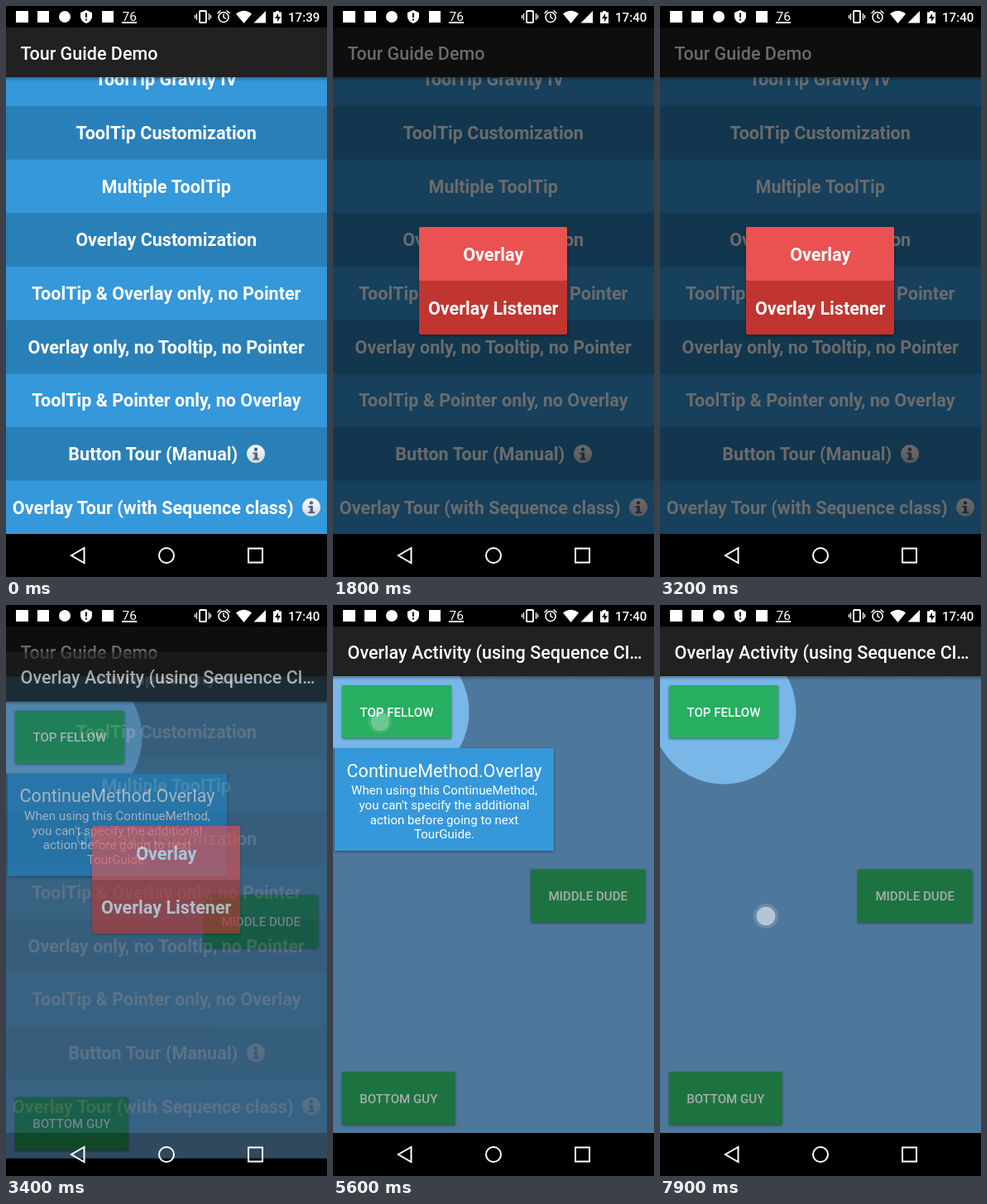
An HTML page for the animation above (8000 ms loop, 388 px wide and 690 px high).

```html
<!DOCTYPE html>
<html lang="en">
<head>
<meta charset="utf-8">
<title>Tour Guide Demo</title>
<style>
  html, body { margin: 0; width: 100%; height: 100%; overflow: hidden; background: #000; }
  svg { display: block; width: 388px; height: 690px; font: 500 21.56px Roboto, sans-serif; }
  text { fill: #fff; }
  .row { font-weight: 700; text-anchor: middle; }
  .small { font-size: 15.09px; text-anchor: middle; }
  .plain { font-weight: 400; text-anchor: middle; }
  .dimmed { fill: #a9adab; }
  .line { fill: none; stroke: #fff; stroke-width: 2; }
  .shadow { filter: drop-shadow(0 1.5px 1.5px rgba(0, 0, 0, .45)); }
</style>
</head>
<body>
<svg viewBox="0 0 388 690">
  <defs>
    <linearGradient id="fade" x2="0" y2="1">
      <stop stop-opacity=".3"/><stop offset="1" stop-opacity="0"/>
    </linearGradient>
    <linearGradient id="badge" x2="0" y2="1">
      <stop stop-color="#fff"/><stop offset="1" stop-color="#cfd4d8"/>
    </linearGradient>
    <clipPath id="page"><rect y="86" width="388" height="552"/></clipPath>
  </defs>
  <rect width="388" height="690"/>
  <g id="list"></g>
  <rect id="dim" y="26" width="388" height="612"/>
  <g id="activity"></g>
  <g id="popup"></g>
  <g id="touch" fill="#fff">
    <circle r="15" opacity=".15"/><circle r="11.3" opacity=".5"/>
  </g>
  <g id="status" fill="#fff">
    <rect width="388" height="26" fill="#000"/>
    <rect x="12" y="6" width="15" height="14"/>
    <rect x="38" y="6" width="14" height="14"/>
    <circle cx="71" cy="13" r="7"/>
    <path d="M97 5l7 3v5q0 5-7 8q-7-3-7-8V8z"/>
    <path d="M97 8.500v5.500M97 15.500v2" stroke="#000" stroke-width="2"/>
    <rect x="116" y="6" width="14" height="14"/>
    <text x="140.500" y="18" font-size="15.500" font-weight="400">76</text>
    <path d="M140 20h18" class="line" stroke-width="1"/>
    <rect x="234" y="6" width="8" height="14" rx="1" class="line"/>
    <path d="M230.500 9v8M245.500 9v8M228.500 11v4M247.500 11v4" class="line" style="stroke-width:1.300"/>
    <circle cx="263" cy="13.500" r="6" class="line" style="stroke-width:1.600"/>
    <path d="M263 9.500v4l3 2M255.500 9l4-3.500M270.500 9l-4-3.500" class="line" style="stroke-width:1.500"/>
    <path d="M278 9.500q9.500-7.500 19 0L287.500 21z"/>
    <path d="M299.500 20.500h14.500V6z"/>
    <path d="M323 7.500h3V6h4v1.500h3V21h-10z"/>
    <path d="M329 9l-4 6h3v4l4-6h-3z" fill="#000"/>
    <text id="clock" x="341" y="18.800" font-size="15.090"></text>
  </g>
  <g class="line">
    <path d="M94.500 655v18L79 664z"/>
    <circle cx="194" cy="664" r="9"/>
    <path d="M293 655.500h17v17h-17z"/>
  </g>
</svg>
<script>
const $ = id => document.getElementById(id);
const rect = (x, y, w, h, fill, extra = '') =>
  `<rect x="${x}" y="${y}" width="${w}" height="${h}" fill="${fill}" ${extra}/>`;
const text = (x, y, cls, s) => `<text x="${x}" y="${y}" class="${cls}">${s}</text>`;
const bar = title => rect(0, 86, 388, 5, 'url(#fade)') +
  rect(0, 26, 388, 60, '#212121') + text(17.5, 64.7, '', title);
const info = (x, y) => `<circle cx="${x}" cy="${y}" r="11" fill="url(#badge)"/>
  <g fill="#4c6480"><circle cx="${x}" cy="${y - 5.5}" r="2.2"/>
  <path d="M${x - 3.5} ${y - 1.8}h5.500v7h2v2h-7.500v-2h2v-5h-2z"/></g>`;
const button = (x, y, w, label, lit) =>
  rect(x, y, w, 64, lit ? '#27ae60' : '#1c7340', 'rx="1.5" class="shadow"') +
  text(x + w / 2, y + 37.7, lit ? 'small' : 'small dimmed', label);

const rowH = 64.65;
const rows = ['ToolTip Gravity IV', 'ToolTip Customization', 'Multiple ToolTip',
  'Overlay Customization', 'ToolTip &amp; Overlay only, no Pointer',
  'Overlay only, no Tooltip, no Pointer', 'ToolTip &amp; Pointer only, no Overlay',
  'Button Tour (Manual)', 'Overlay Tour (with Sequence class)'];
const badges = { 7: 302, 8: 369 };

$('list').innerHTML = '<g clip-path="url(#page)">' + rows.map((label, i) => {
  const y = 56.3 + i * rowH, mid = y + rowH / 2, badge = badges[i];
  return rect(0, y, 388, rowH + .5, i % 2 ? '#2980b9' : '#3498db') +
    text(badge ? 177.7 : 193.7, mid + 7.7, 'row', label) + (badge ? info(badge, mid) : '');
}).join('') + '</g>' + bar('Tour Guide Demo');

$('popup').innerHTML = '<g class="shadow">' + rect(104, 267, 179, 130, '#c0352f', 'rx="2"') +
  rect(104, 267, 179, 65, '#e95250', 'rx="2"') + '</g>' +
  text(193.7, 308, 'row', 'Overlay') + text(193.7, 373, 'row', 'Overlay Listener');

const hint = ['When using this ContinueMethod,', "you can't specify the additional",
  'action before going to next', 'TourGuide.'];
$('activity').innerHTML = rect(0, 86, 388, 552, '#4e789b') +
  '<circle cx="77" cy="129" r="87.5" fill="#78b7e8" clip-path="url(#page)"/>' +
  button(11, 97, 132, 'TOP FELLOW', true) +
  button(239, 319.5, 138.5, 'MIDDLE DUDE') + button(11, 564, 136.5, 'BOTTOM GUY') +
  '<g id="tip">' + rect(2, 173, 265, 124, '#3498db', 'class="shadow"') +
  text(134.5, 207.5, 'plain', 'ContinueMethod.Overlay') +
  hint.map((s, i) => text(134.5, 229.4 + i * 17.65, 'small plain', s)).join('') + '</g>' +
  bar('Overlay Activity (using Sequence Cl…');

// x, y, press time, release time
const taps = [[146, 611, 1200, 1530], [190, 292, 2350, 2750], [57, 141, 5250, 5510],
  [57, 141, 6700, 6950], [128, 376, 7350, 8000]];
const ramp = (t, from, to) => Math.min(1, Math.max(0, (t - from) / (to - from)));
const fade = (id, v) => $(id).setAttribute('opacity', v);
const move = (id, x, y) => $(id).setAttribute('transform', `translate(${x} ${y})`);

function draw(now) {
  const t = now % 8000;
  $('clock').textContent = t < 100 ? '17:39' : '17:40';
  fade('dim', .58 * ramp(t, 1600, 1800));
  fade('popup', ramp(t, 1500, 1800) * (1 - ramp(t, 3320, 3520)));
  fade('activity', ramp(t, 3300, 3465));
  move('activity', 0, 55 * (1 - ramp(t, 3300, 3700)) ** 2);
  fade('tip', t < 7700 ? 1 : 0);
  const tap = taps.find(([, , down, up]) => t >= down && t < up + 200);
  fade('touch', tap ? ramp(t, tap[2], tap[2] + 50) * (1 - ramp(t, tap[3], tap[3] + 200)) : 0);
  if (tap) move('touch', tap[0], tap[1]);
}

const start = performance.now();
function tick() {
  draw(performance.now() - start);
  requestAnimationFrame(tick);
}
tick();
</script>
</body>
</html>
```
